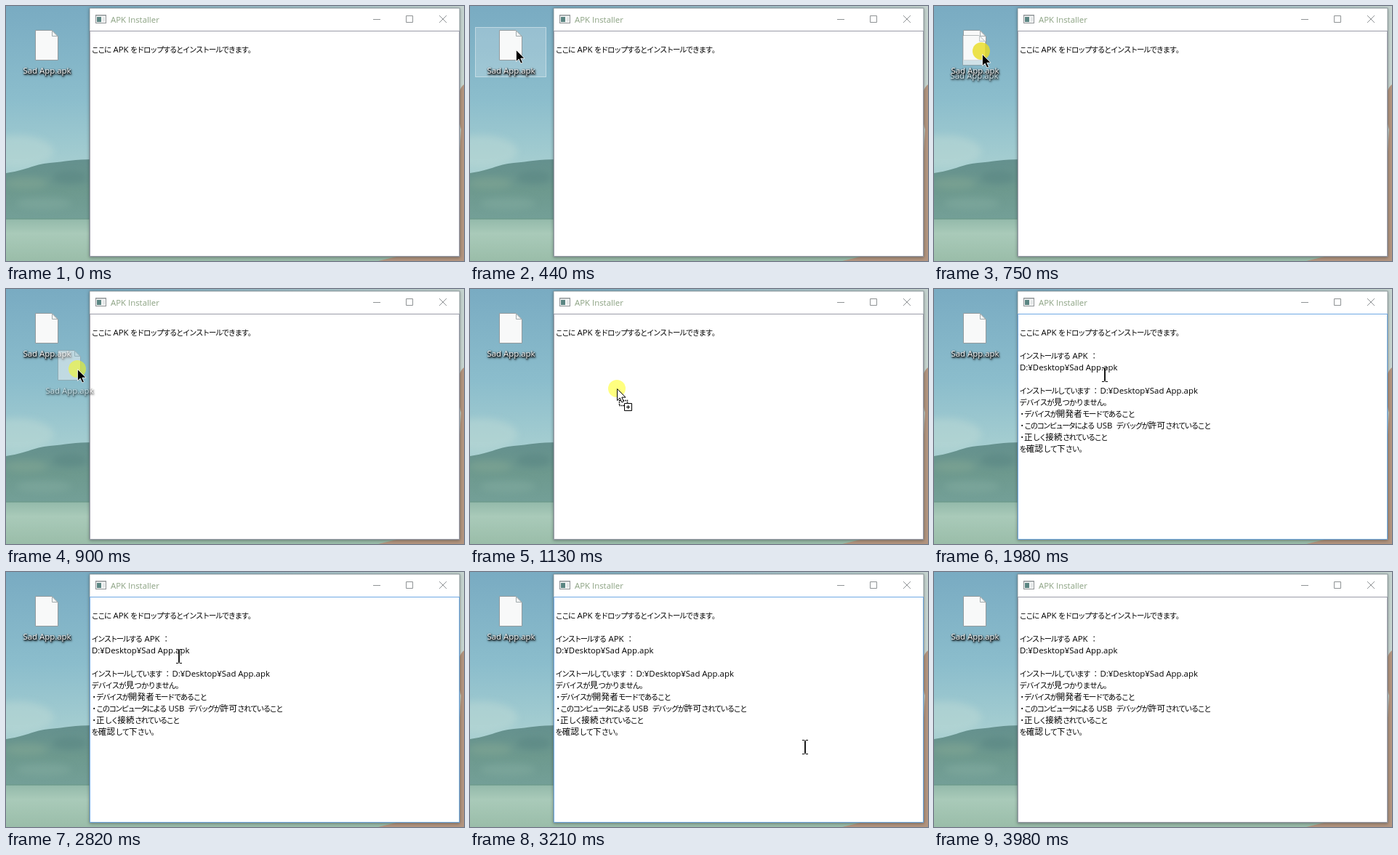
An HTML page that plays this animation: 630x351 px, repeating every 4360 ms.

```html
<!DOCTYPE html>
<html lang="ja">
<head>
<meta charset="utf-8">
<title>Installer demo</title>
<style>
  html, body { margin: 0; width: 100%; height: 100%; overflow: hidden; background: #8fb9bf; }
  svg { display: block; width: 630px; height: 351px; }
  text { font: 11.4px "Open Sans", "Noto Sans", sans-serif; white-space: pre; }
  .kana { font: 10.4px "Noto Sans CJK JP", "Noto Sans CJK", sans-serif; font-kerning: none; }
  .kanji { font-size: 11.5px; letter-spacing: .3px; }
  .label { fill: #fff; text-anchor: middle; filter: drop-shadow(1px 1px 1px #000) drop-shadow(0 1px 1px #000); }
  .window { filter: drop-shadow(0 1px 2px #0005); }
</style>
</head>
<body>
<svg viewBox="0 0 630 351">
  <defs>
    <linearGradient id="sky" x2="0" y2="1">
      <stop offset="0" stop-color="#79abc2"/>
      <stop offset=".55" stop-color="#8bbdcc"/>
      <stop offset="1" stop-color="#a9d0d1"/>
    </linearGradient>
    <linearGradient id="haze">
      <stop offset=".2" stop-color="#d3dbd2" stop-opacity="0"/>
      <stop offset="1" stop-color="#d3dbd2" stop-opacity=".85"/>
    </linearGradient>
    <linearGradient id="hill" x2="0" y2="1">
      <stop offset="0" stop-color="#64908e"/>
      <stop offset=".5" stop-color="#6d998e"/>
      <stop offset="1" stop-color="#74a098"/>
    </linearGradient>
    <linearGradient id="water" x2="0" y2="1">
      <stop offset="0" stop-color="#93b9aa"/>
      <stop offset=".35" stop-color="#a9cab9"/>
      <stop offset="1" stop-color="#9abda9"/>
    </linearGradient>
    <filter id="soft" x="-30%" y="-50%" width="160%" height="200%"><feGaussianBlur stdDeviation="5"/></filter>
    <g id="file">
      <path d="M40.5 33.5H63L71.5 42V74.5H40.5Z" fill="#f8f9f9" stroke="#929a9d"/>
      <path d="M63.5 34V41.5H71Z" fill="#f0f3f3" stroke="#a3abad"/>
      <text class="label" x="56.5" y="93">Sad App.apk</text>
    </g>
    <path id="arrow" d="M.5 .5V16.5L4.2 13L6.9 19L9.4 17.9L6.8 12.1H12Z"/>
  </defs>

  <rect width="630" height="230" fill="url(#sky)"/>
  <rect width="630" height="230" fill="url(#haze)"/>
  <ellipse cx="15" cy="200" rx="50" ry="22" fill="#bcd9d5" opacity=".5" filter="url(#soft)"/>
  <path d="M0 230C25 227 38 218 60 216S95 211 120 211L630 225V296H0Z" fill="url(#hill)"/>
  <g filter="url(#soft)" opacity=".5">
    <ellipse cx="28" cy="244" rx="30" ry="8" fill="#84a894"/>
    <ellipse cx="88" cy="236" rx="24" ry="9" fill="#578381"/>
    <ellipse cx="52" cy="272" rx="38" ry="8" fill="#83aca0"/>
  </g>
  <rect y="293" width="630" height="58" fill="url(#water)"/>
  <rect y="292" width="116" height="2" fill="#6d9a8c" opacity=".7"/>
  <path d="M630 108C618 116 620 150 626 170L620 262L600 330L512 351H630Z" fill="#b3957f"/>

  <rect x="7.5" y="29.5" width="97" height="68" id="hover" fill="#fff" stroke="#fff" stroke-opacity=".45"/>
  <use href="#file"/>

  <g class="window"><rect x="115" y="3" width="509" height="342" fill="#fff" stroke="#7d8b90" stroke-width=".8"/></g>
  <g fill="none" stroke="#8f9395">
    <rect x="123.5" y="12.5" width="14" height="11" fill="#f5f6f6"/>
    <path d="M124 13.5H137" stroke="#c3c8ca"/>
    <path d="M133 16.5H136M133 18.5H136M133 20.5H136" stroke="#d0d5d6"/>
    <rect x="125" y="15" width="6" height="7" fill="#5b8582" stroke="none"/>
    <path d="M505 18.5H515M550.5 13.5H559.5V22.5H550.5ZM596 13L606 23M606 13L596 23"/>
  </g>
  <text x="144" y="23" fill="#8aa181">APK Installer</text>
  <rect id="box" x="115.5" y="34.5" width="508" height="310" fill="#fff"/>

  <g id="intro"></g>
  <g id="started"></g>
  <g id="failed"></g>

  <use href="#file" id="ghost"/>
  <circle id="press" r="12"/>
  <g id="cursor">
    <use href="#arrow" id="pointer" fill="#000" stroke="#fff" stroke-width=".8"/>
    <g id="copy" fill="#fff" stroke="#000">
      <path d="M3.5 16.5H14.5V23.5H3.5Z" fill="none" stroke-width="1.6" stroke-dasharray="1.5 1"/>
      <use href="#arrow"/>
      <path d="M10.5 20.5H20.5V30.5H10.5ZM13 25.5H18M15.5 23V28"/>
    </g>
    <g id="beam" fill="none" stroke="#000">
      <path d="M-4 -9.5H-1L0 -8.5L1 -9.5H4M-4 9.5H-1L0 8.5L1 9.5H4"/>
      <path d="M0 -8.5V8.5" stroke-width="1.8"/>
    </g>
  </g>
</svg>
<script>
const el = id => document.getElementById(id);
const KANA = 10.4;

// Latin runs have no advance; kana runs give the advance of one kana.
function run(x, y, text, advance) {
  if (!advance) return `<text x="${x}" y="${y}">${text}</text>`;
  const body = text.replace(/[一-龠]+/g, '<tspan class="kanji">$&</tspan>');
  return `<text class="kana" x="${x}" y="${y}" style="letter-spacing:${(advance - KANA).toFixed(2)}px">${body}</text>`;
}
const write = (id, runs) => el(id).innerHTML = runs.map(r => run(...r)).join('');

const path = 'D:¥Desktop¥Sad App.apk';
write('intro', [
  [117.5, 64, 'ここに', 8.7], [147.5, 64, 'APK'],
  [171, 64, 'をドロップするとインストールできます。', 9]
]);
write('started', [
  [117.5, 96, 'インストールする', 8.6], [190.5, 96, 'APK'], [215, 96, '：', KANA],
  [118, 112, path],
  [117.5, 144, 'インストールしています', 8.75], [217, 144, '：', KANA], [228.5, 144, path]
]);
write('failed', [
  [117.5, 160, 'デバイスが見つかりません。', 9.45],
  [116, 176, '・', KANA], [124, 176, 'デバイスが開発者モードであること', 8.95],
  [116, 192, '・', KANA], [124, 192, 'このコンピュータによる', 8.7], [223.5, 192, 'USB'],
  [250.5, 192, 'デバッグが許可されていること', 8.85],
  [116, 208, '・', KANA], [124, 208, '正しく接続されていること', 8.75],
  [117.5, 224, 'を確認して下さい。', 9.3]
]);

const LOOP = 4360, TICK = 77, FIRST = 130;
// time, x, y of the pointer's hot spot
const keys = [
  [130, 14, 72], [207, 34, 67], [361, 60, 60], [515, 66, 59], [669, 66, 60],
  [746, 66, 66], [823, 75, 82], [900, 98, 110], [977, 124, 129], [1054, 151, 138], [1131, 202, 137],
  [1208, 205, 136], [1362, 230, 121], [1439, 235, 118], [2748, 235, 119],
  [2825, 238, 116], [2979, 300, 150], [3133, 445, 233], [3210, 461, 241],
  [3441, 461, 241], [3518, 462, 246], [3749, 468, 290], [3903, 476, 338], [3980, 480, 370]
];

function pointerAt(t) {
  const i = keys.findIndex(k => k[0] > t);
  if (i < 0) return keys[keys.length - 1].slice(1);
  if (i === 0) return keys[0].slice(1);
  const [t0, x0, y0] = keys[i - 1], [t1, x1, y1] = keys[i];
  const p = (t - t0) / (t1 - t0);
  return [x0 + (x1 - x0) * p, y0 + (y1 - y0) * p].map(Math.round);
}

const show = (id, on) => el(id).style.display = on ? '' : 'none';
const place = (id, x, y) => el(id).setAttribute('transform', `translate(${x} ${y})`);

function draw(ms) {
  const t = FIRST + Math.floor((ms - 124) / TICK) * TICK;
  const during = (a, b) => t >= a && t < b;
  const [x, y] = pointerAt(t);
  const early = t < 800;

  show('hover', during(125, 660));
  el('hover').setAttribute('fill-opacity', t < 510 ? .2 : .32);
  show('ghost', during(660, 1125));
  place('ghost', x - 67, y - 59);
  el('ghost').setAttribute('opacity', early ? .65 : .5);

  show('press', during(510, 1890));
  place('press', early ? x - 1 : x, early && t > 700 ? y - 4 : y);
  el('press').setAttribute('fill', early ? '#e8dc20' : '#ff0');
  el('press').setAttribute('fill-opacity', early ? .8 : .5);

  show('cursor', during(125, 3970));
  place('cursor', x, y);
  show('pointer', during(125, 970));
  show('copy', during(970, 1890));
  show('beam', t >= 1890);

  show('started', t >= 1890);
  show('failed', t >= 1970);
  el('box').setAttribute('stroke', during(1890, 3970) ? '#6fa9e4' : '#9a9ca8');
}

const start = performance.now();
function loop() {
  draw((performance.now() - start) % LOOP);
  requestAnimationFrame(loop);
}
loop();
</script>
</body>
</html>
```
